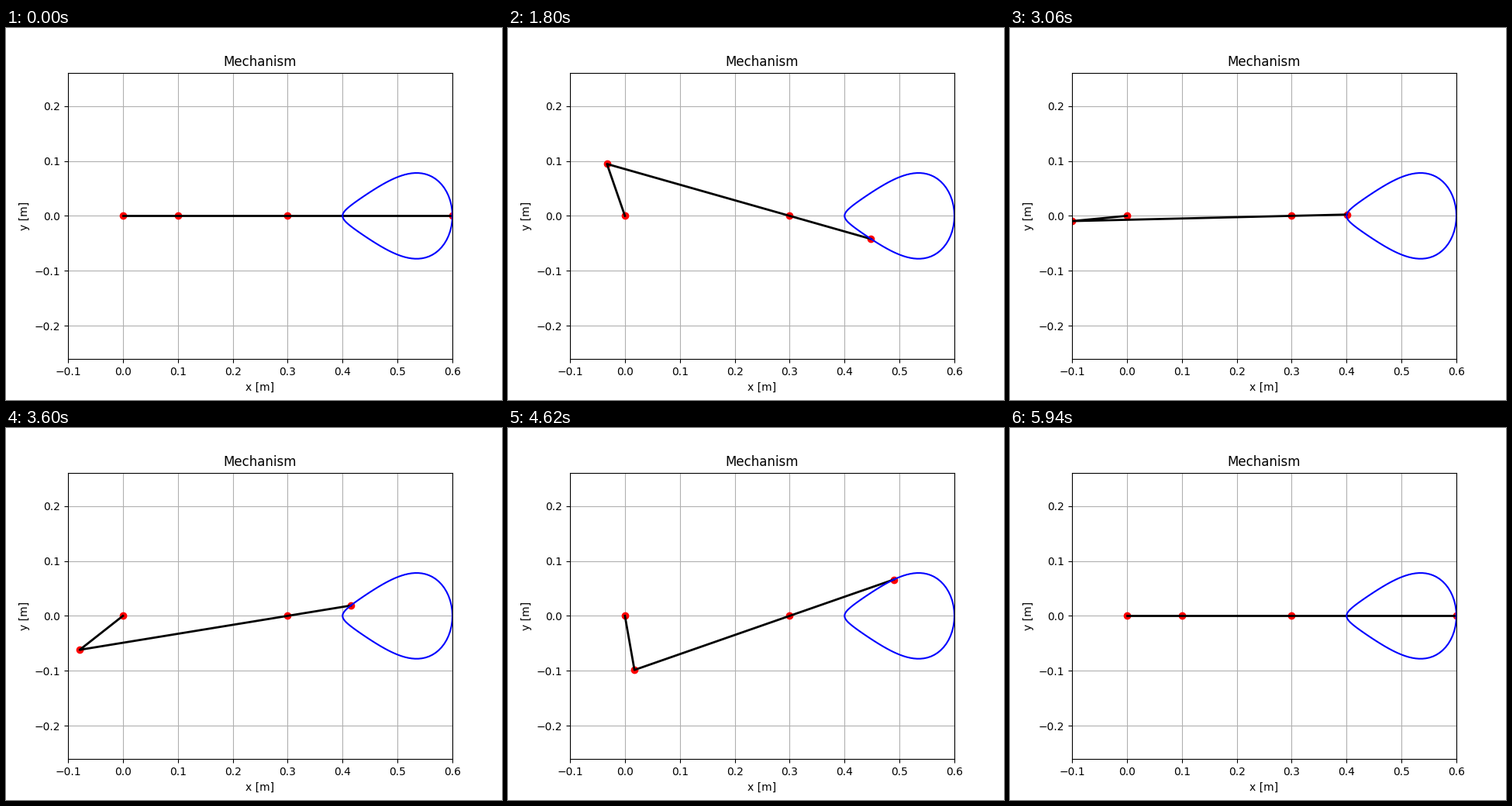
Recreate the animation shown at these times as a matplotlib script. Size 640 by 480 pixels, loop 6000 ms.

```python
import numpy as np
import matplotlib.pyplot as plt
from matplotlib.animation import FuncAnimation

FRAMES = 100
CRANK = 0.1    # crank length [m]
ROD = 0.5      # rod length [m]
PIVOT = 0.3    # x of the fixed slider the rod passes through [m]

# Crank pin and rod tip over one full turn
theta = np.linspace(0, 2 * np.pi, FRAMES)
pin_x, pin_y = CRANK * np.cos(theta), CRANK * np.sin(theta)
reach = np.hypot(PIVOT - pin_x, pin_y)
tip_x = pin_x + ROD * (PIVOT - pin_x) / reach
tip_y = pin_y - ROD * pin_y / reach

fig, ax = plt.subplots(figsize=(6.4, 4.8), dpi=100)
ax.set_title("Mechanism")
ax.set_xlabel("x [m]")
ax.set_ylabel("y [m]")
ax.grid(True)

joints, = ax.plot([], [], "ro")
links, = ax.plot([], [], "k-", lw=2)
ax.plot(tip_x, tip_y, "b-")

# Equal scale on both axes, filling the default axes box
half_height = 0.35 * 369.6 / 496
ax.set_xlim(-0.1, 0.6)
ax.set_ylim(-half_height, half_height)


def update(i):
    joints.set_data([0, pin_x[i], PIVOT, tip_x[i]], [0, pin_y[i], 0, tip_y[i]])
    links.set_data([0, pin_x[i], tip_x[i]], [0, pin_y[i], tip_y[i]])
    return joints, links


anim = FuncAnimation(fig, update, frames=FRAMES, interval=60,
                     repeat=True, repeat_delay=0)
plt.show()
```
